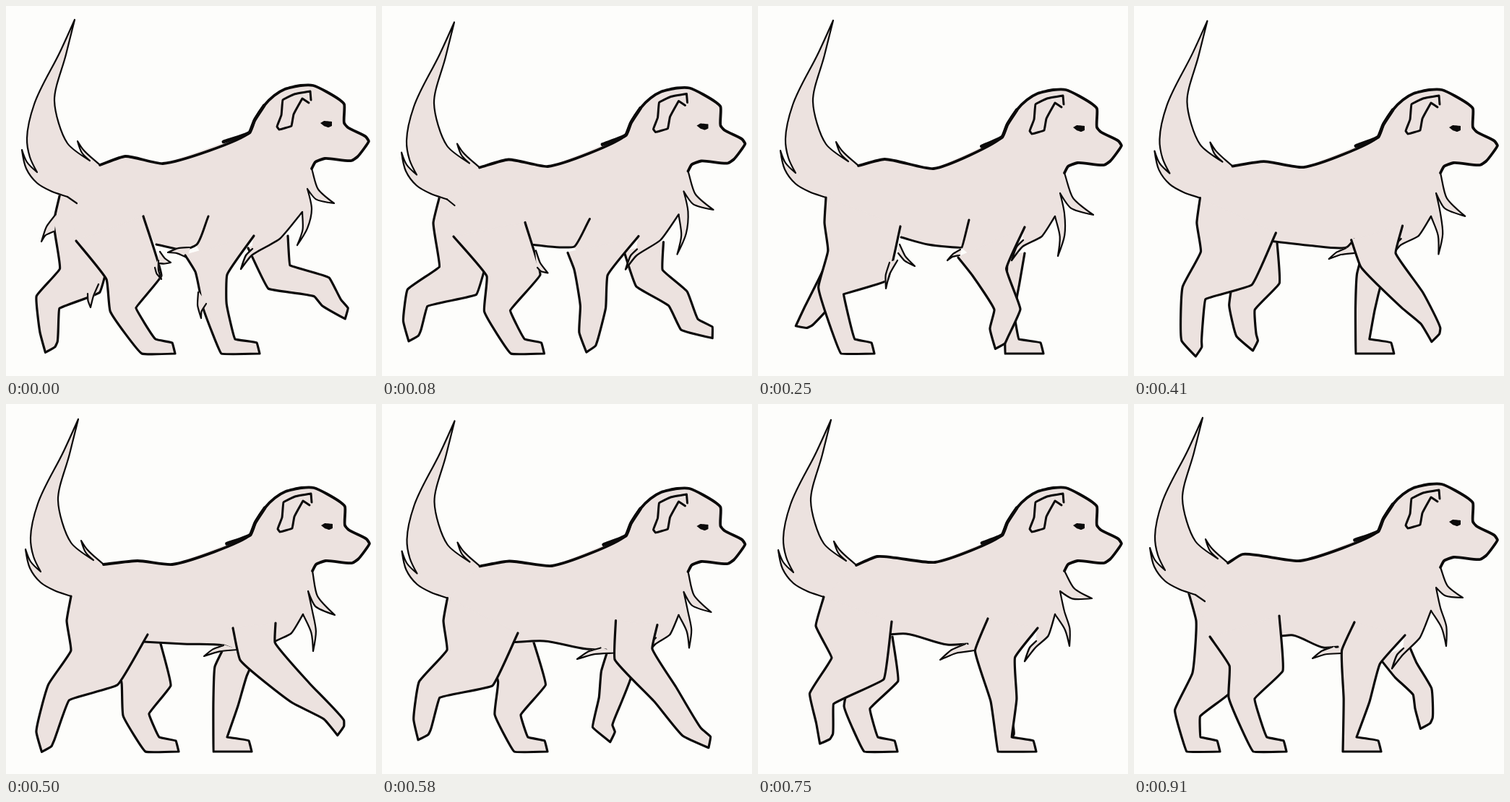
An HTML page with a canvas for the animation above (1000 ms loop, 512 by 512 pixels).

```html
<!DOCTYPE html>
<html lang="en">
<head>
<meta charset="utf-8">
<title>Walking dog</title>
<style>
html, body { margin: 0; height: 100%; overflow: hidden; background: #fdfdfb; }
canvas { display: block; width: 100vw; height: 100vh; }
</style>
</head>
<body>
<canvas id="stage" width="512" height="512"></canvas>
<script>
const ctx = document.getElementById('stage').getContext('2d');
const COAT = '#ece2df', INK = '#0b0a0a', PAPER = '#fdfdfb';
const LOOP = 1000;
const STEPS = [0, 80, 160, 250, 330, 410, 500, 580, 660, 750, 830, 910];

const parse = s => s.split(' ').map(p => p.split(',').map(Number));
const add = ([x, y], [dx, dy]) => [x + dx, y + dy];
const lerp = (p, q, k) => p.map((v, i) => v + (q[i] - v) * k);
const unit = (p, q) => {
  const dx = q[0] - p[0], dy = q[1] - p[1], len = Math.hypot(dx, dy) || 1;
  return [dx / len, dy / len, len];
};

// Parts that only shift from step to step
const HEAD = parse('338,182 345,165 358,145 372,131 387,122 409,117 426,117 463,137 469,143 469,169 474,175 499,188 503,194 487,216 479,221 442,218 429,223 424,232');
const EAR = parse('423,137 422,125 400,129 384,137 382,158 376,174 379,178 396,173 399,157 411,135 420,141');
const EYE = parse('436,169 441,166 452,167 452,173 447,175 441,173');
const TAIL = parse('95,271 72,263 53,252 38,232 32,206 39,223 53,237 43,216 39,190 49,143 85,70 105,26 93,74 77,138 95,197 126,221 115,210 109,194 117,206 140,227');

// Key poses. A leg is: top back, top front, knee (x, y, half width), hock, ankle (x, y, foot tilt)
const poses = new Map();
function pose(time, parts) {
  const p = {};
  for (const k in parts) p[k] = parse(parts[k]);
  poses.set(time, p);
}

pose(0, {
  head: '-1,-7', tail: '-10,-7', back: '165,208 217,218',
  belly: '208,330 246,337 264,330 280,291', tips: '454,273 403,331',
  nearHind: '97,325 190,291 177,376,38 162,420 197,473,0',
  farHind: '66,300 154,300 102,380,32 58,410 57,458,75',
  nearFront: '248,345 343,318 284,370,22 289,415 307,473,0',
  farFront: '335,335 390,318 378,375,22 437,389 449,412,30',
  hook: '13,9',
  bellyFur: '254,334 224,341 250,348', rumpFur: '69,288 49,326 66,312',
  heelFur: '113,398 117,417 128,385', elbowFur: '266,396 270,432 277,412',
  kneeFur: '213,340 228,355 211,356', thighFur: '211,352 215,378 206,362'
});
pose(160, {
  head: '0,0', tail: '0,0', back: '185,217 242,226',
  belly: '212,331 246,331 268,336 295,298', tips: '463,291 414,356',
  nearHind: '101,313 206,308 187,370,36 157,424 178,473,0',
  farHind: '76,300 164,300 108,380,32 40,398 22,427,75',
  nearFront: '266,338 367,319 294,367,25 295,418 260,442,140',
  farFront: '335,345 389,335 362,378,21 382,421 400,473,0',
  hook: '8,8',
  kneeFur: '213,337 231,384 219,368'
});
pose(250, {
  head: '0,-1', tail: '-1,-6', back: '175,212 243,225',
  belly: '198,320 235,330 282,334 292,296', tips: '464,289 415,346',
  nearHind: '92,300 197,305 138,359,46 101,394 124,473,0',
  farHind: '95,310 170,310 125,360,30 95,395 68,428,115',
  nearFront: '277,348 369,306 320,368,24 345,420 331,453,75',
  farFront: '345,345 369,342 353,382,9 348,425 351,473,0',
  bellyFur: '280,337 262,352 279,345',
  kneeFur: '196,330 217,360 194,342', thighFur: '182,355 177,391 193,352'
});
pose(500, {
  head: '0,-1', tail: '-5,-5', back: '182,217 230,222',
  belly: '190,329 245,332 301,334 312,338', tips: '455,292 425,342',
  nearHind: '84,300 196,319 122,365,40 73,399 52,460,75',
  farHind: '150,340 213,328 194,388,34 180,430 202,473,0',
  nearFront: '314,310 373,303 348,342,27 408,400 452,438,50',
  farFront: '300,340 345,350 311,370,23 304,415 296,473,0',
  bellyFur: '301,334 274,349 320,340'
});
pose(660, {
  head: '-1,1', tail: '-4,0', back: '170,218 240,226',
  belly: '168,331 203,324 265,344 308,342', tips: '456,284 425,333',
  nearHind: '86,300 180,315 121,365,40 58,392 55,427,80',
  farHind: '145,345 205,325 193,385,32 168,430 182,473,0',
  nearFront: '333,289 389,308 348,350,27 377,405 403,473,0',
  farFront: '322,350 345,350 337,378,19 327,405 311,421,80',
  bellyFur: '304,341 266,357 322,349'
});
pose(750, {
  head: '0,-1', tail: '-4,-4', back: '165,211 245,219',
  belly: '180,319 205,318 262,333 290,332', tips: '462,269 431,335',
  nearHind: '80,307 185,301 138,366,39 88,408 90,449,80',
  farHind: '98,330 186,322 160,380,34 137,420 156,473,0',
  nearFront: '318,297 387,310 328,346,28 340,410 341,473,0',
  farFront: '320,340 350,340 332,360,11 340,415 340,450,75',
  bellyFur: '287,332 252,354 300,341'
});
pose(910, {
  head: '0,-6', tail: '-10,-7', back: '150,208 230,217',
  belly: '204,321 220,320 262,337 282,336', tips: '455,268 432,335',
  nearHind: '105,322 201,293 169,366,37 149,407 174,473,0',
  farHind: '86,300 170,290 108,385,30 74,428 82,473,0',
  nearFront: '305,302 375,320 314,350,28 308,410 298,473,0',
  farFront: '340,352 381,335 376,368,18 399,398 399,428,75',
  hook: '13,9',
  bellyFur: '275,336 247,352 287,345'
});

// Steps between two key poses blend them by time
function poseAt(time) {
  if (poses.has(time)) return poses.get(time);
  const times = [...poses.keys()];
  const next = times.findIndex(t => t > time), t0 = times[next - 1], t1 = times[next];
  const a = poses.get(t0), b = poses.get(t1), out = {};
  for (const k in a) {
    if (b[k]) out[k] = a[k].map((p, i) => lerp(p, b[k][i], (time - t0) / (t1 - t0)));
  }
  return out;
}

// Foot outline from heel round to instep; it shortens as it lifts
function foot([x, y, tilt], reach) {
  const len = reach - (reach - 20) * Math.min(1, tilt / 45);
  const a = tilt * Math.PI / 180, c = Math.cos(a), s = Math.sin(a);
  return [[-9, 8], [len, 8], [len - 4, -7], [10, -12]]
    .map(([u, v]) => [x + u * c - v * s, y + u * s + v * c]);
}

// Leg outline: down the back, round the foot and up the front
function limb([back, front, knee, hock, ankle], reach) {
  const chain = [lerp(back, front, 0.5), knee, hock, ankle];
  const widths = [0, knee[2], Math.min(18, knee[2] * 0.75)];
  const side = (i, sign) => {
    const u = unit(chain[i - 1], chain[i]), v = unit(chain[i], chain[i + 1]);
    const n = unit([0, 0], [-u[1] - v[1], u[0] + v[0]]), w = widths[i] * sign;
    return [chain[i][0] + n[0] * w, chain[i][1] + n[1] * w];
  };
  return [back, side(1, 1), side(2, 1), ...foot(ankle, reach), side(2, -1), side(1, -1), front];
}

// Tapered lock of fur, both edges bowed the same way
function lock(a, tip, b, bow) {
  const [x, y, len] = unit(a, tip), off = [-y * len * bow, x * len * bow];
  return [a, add(lerp(a, tip, 0.5), off), tip, add(lerp(tip, b, 0.5), off), b];
}

// Smooth line through points; sharp turns stay sharp
function curve(pts, bend) {
  const dirs = pts.slice(1).map((p, i) => unit(pts[i], p));
  const tangent = i => {
    const a = dirs[i - 1] || dirs[i], b = dirs[i] || a;
    const k = Math.max(0, a[0] * b[0] + a[1] * b[1]) / 2;
    return [(a[0] + b[0]) * k, (a[1] + b[1]) * k];
  };
  const path = new Path2D();
  path.moveTo(...pts[0]);
  dirs.forEach((d, i) => {
    const p = pts[i], q = pts[i + 1], s = tangent(i), e = tangent(i + 1), k = d[2] * bend;
    path.bezierCurveTo(p[0] + s[0] * k, p[1] + s[1] * k, q[0] - e[0] * k, q[1] - e[1] * k, q[0], q[1]);
  });
  return path;
}

function line(pts, width, bend = 0.2) {
  ctx.strokeStyle = INK;
  ctx.lineWidth = width;
  ctx.stroke(curve(pts, bend));
}

function coat(pts, bend) {
  const path = curve(pts, bend);
  path.closePath();
  ctx.fillStyle = ctx.strokeStyle = COAT;
  ctx.lineWidth = 2;
  ctx.fill(path);
  ctx.stroke(path);
}

function shape(pts, width, bend = 0.2) {
  coat(pts, bend);
  line(pts, width, bend);
}

function draw(p) {
  ctx.fillStyle = PAPER;
  ctx.fillRect(0, 0, 512, 512);
  ctx.lineCap = ctx.lineJoin = 'round';

  const byHead = pt => add(pt, p.head[0]);
  const head = HEAD.map(byHead), tail = TAIL.map(pt => add(pt, p.tail[0]));
  const root = tail[0], top = [tail[tail.length - 1], ...p.back, ...head];

  const chest = [
    ...lock(head[head.length - 1], p.tips[0], byHead([418, 260]), 0.14),
    ...lock(byHead([424, 288]), p.tips[1], byHead([411, 292]), -0.08)
  ];
  const breast = chest[chest.length - 1], shoulder = p.nearFront[1];
  const fold = add(shoulder, [-3, 27]);
  const brisket = [breast, add(lerp(breast, fold, 0.5), [4, 7]), fold,
    ...[[-18, 46], [-11, 27], [-2, 18]].map(d => add(shoulder, d))];

  // The rump line belongs to whichever hind leg trails
  const nearHind = limb(p.nearHind, 37), farHind = limb(p.farHind, 37);
  (p.hook ? farHind : nearHind).unshift(p.hook ? add(root, [-10, -5]) : root);

  shape(farHind, 3.2, 0.15);
  shape(limb(p.farFront, 44), 3.2, 0.15);
  coat([root, ...top, ...chest, ...brisket, shoulder, p.nearFront[2],
    p.belly[2], p.belly[1], p.belly[0], p.nearHind[1], p.nearHind[0]], 0.1);

  shape(tail, 2.2, 0.33);
  if (p.hook) line([root, add(root, p.hook[0])], 2.2);
  line(p.belly, 3, 0.3);
  line(chest, 2.2, 0.3);
  line(brisket, 2.4);

  const fur = (...names) => names.forEach(k => p[k] && shape(lock(...p[k], 0.08), 2.2));
  fur('bellyFur', 'rumpFur', 'heelFur');
  shape(nearHind, 3.2, 0.15);
  shape(limb(p.nearFront, 44), 3.2, 0.15);
  fur('kneeFur', 'thighFur', 'elbowFur');

  line(top, 3.8, 0.22);
  line([lerp(top[2], head[0], 0.7), ...head.slice(0, 3)], 4.8);
  line(EAR.map(byHead), 3, 0.12);
  ctx.fillStyle = INK;
  ctx.fill(curve(EYE.map(byHead), 0.1));
}

const cycle = STEPS.map(poseAt);
const start = performance.now();
let shown = -1;
function tick() {
  const t = (performance.now() - start) % LOOP;
  const i = STEPS.filter(s => s <= t).length - 1;
  if (i !== shown) draw(cycle[shown = i]);
  requestAnimationFrame(tick);
}
tick();
</script>
</body>
</html>
```
